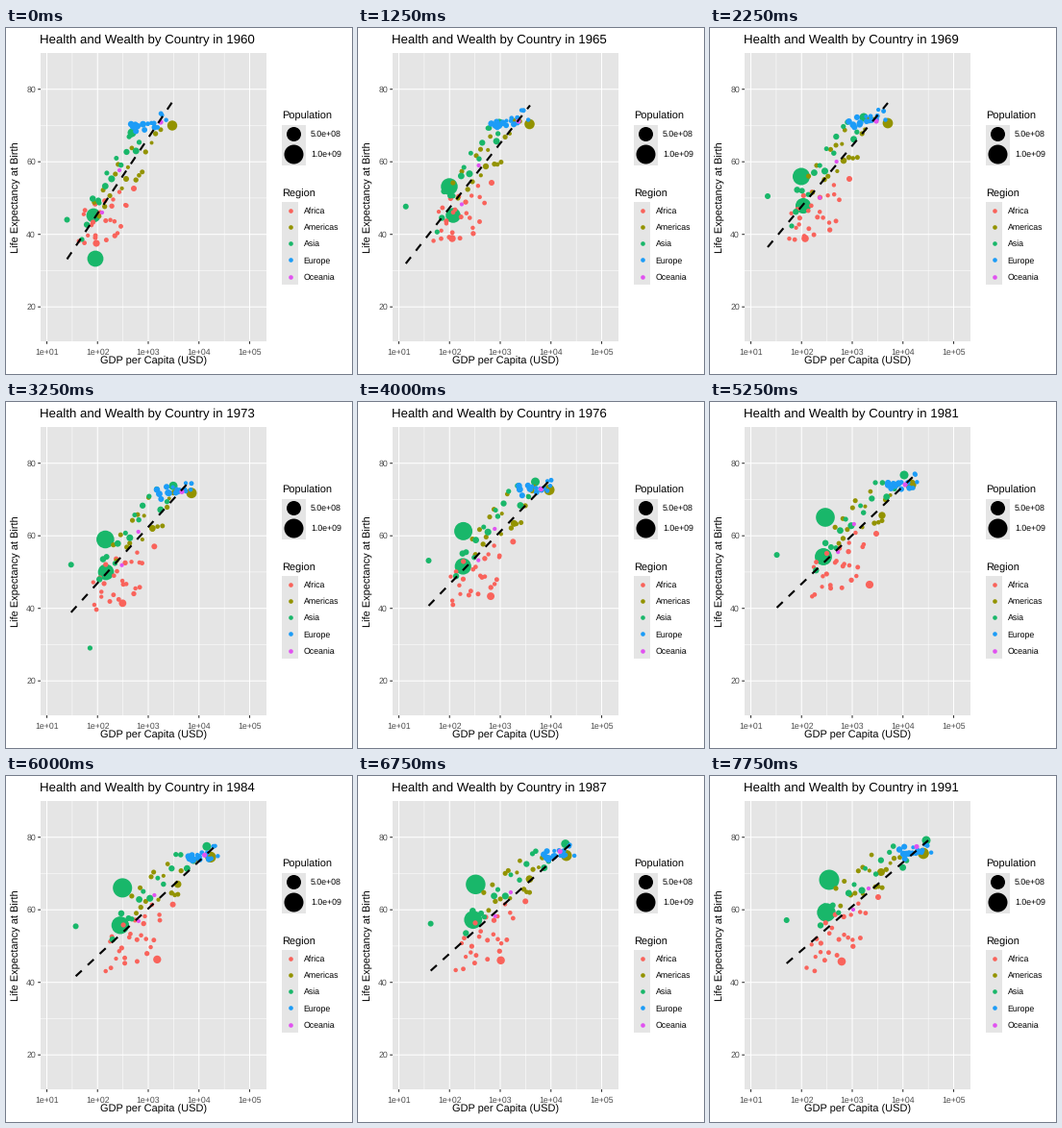
These frames come from a looping animation (360 by 360 pixels, 8000 ms). A matplotlib script:

```python
import numpy as np
import matplotlib.pyplot as plt
from matplotlib.animation import FuncAnimation
from matplotlib.patches import Rectangle

SIZE, YEARS, STEP = 360, 32, 250
FRAMES = np.arange(YEARS)
KEYS = (0, 5, 9, 21, 31)
COLORS = {"Africa": "#f9635b", "Americas": "#939300", "Asia": "#19b76a",
          "Europe": "#1c9cf7", "Oceania": "#e152f0"}
GREY = "#e5e5e5"

plt.rcParams["font.family"] = "Liberation Sans"
plt.rcParams["text.hinting"] = "none"
rng = np.random.default_rng(7)

# One pixel is one point, with y running down.
fig = plt.figure(figsize=(SIZE / 72, SIZE / 72), dpi=72, facecolor="white")
ax = fig.add_axes([0, 0, 1, 1])
ax.set(xlim=(0, SIZE), ylim=(SIZE, 0))
ax.axis("off")


def box(x, y, w, h):
    ax.add_patch(Rectangle((x, y), w, h, fc=GREY, ec="none", zorder=0))


def segment(x0, y0, x1, y1, color, width, z=1):
    ax.plot([x0, x1], [y0, y1], color=color, lw=width, zorder=z,
            solid_capstyle="butt", snap=False)


def label(x, y, s, size, ha="left", color="black", **kw):
    return ax.text(x, y, s, fontsize=size, ha=ha, va="baseline", color=color, **kw)


def draw_panel():
    box(36, 26, 235, 300)
    for i in range(5):
        x = 42.5 + 52.75 * i
        segment(x, 26, x, 326, "white", 1.07, 1.2)
        segment(x, 326, x, 328.8, "#333333", 1.07)
        label(x, 339.5, f"1e+0{i + 1}", 8.8, "center", "#4d4d4d")
        if i < 4:
            segment(x + 26.4, 26, x + 26.4, 326, "white", 0.53)
    for i in range(4):
        y = 290.2 - 75.5 * i
        segment(36, y, 271, y, "white", 1.07, 1.2)
        segment(33.2, y, 36, y, "#333333", 1.07)
        label(31, y + 3.2, str(20 * (i + 1)), 8.8, "right", "#4d4d4d")
        if i < 3:
            segment(36, y - 37.8, 271, y - 37.8, "white", 0.53)
    label(153.5, 350, "GDP per Capita (USD)", 11, "center")
    label(13.7, 176, "Life Expectancy at Birth", 11, "center",
          rotation=90, rotation_mode="anchor")


def draw_legend():
    def key(x, y, r, color):
        ax.scatter([x], [y], s=(2 * r) ** 2, c=color, linewidths=0, zorder=3)

    label(287, 95, "Population", 11)
    box(287, 101, 25, 42)
    for y, r, s in ((110, 7.5, "5.0e+08"), (131, 10, "1.0e+09")):
        key(299.2, y, r, "black")
        label(317, y + 3.2, s, 8.8)
    label(287, 175.5, "Region", 11)
    box(287, 181, 17.3, 86.4)
    for i, (name, color) in enumerate(COLORS.items()):
        y = 189.6 + 17.28 * i
        key(295.7, y, 2.3, color)
        label(309.5, y + 3.2, name, 8.8)


dots = []


def ramp(first, last):
    return np.linspace(first, last, YEARS)


def track(times, *points):
    """Interpolate waypoints into one x and one y per year."""
    return [np.interp(FRAMES, times, axis) for axis in zip(*points)]


def country(region, radii, x, y):
    dots.append((COLORS[region], x, y, ramp(*radii)))


def cloud(region, count, radii, center, spread, slope, scatter):
    """Scatter countries around a moving trend, each wandering a little."""
    cx, cy = track(KEYS, *center)
    along = np.linspace(-1.7, 1.7, count)
    across = rng.permutation(along)
    for u, v in zip(along, across):
        phase, turn = rng.uniform(0, 2 * np.pi, 2)
        dx = ramp(*spread) * u
        x = cx + dx + 2 * np.sin(FRAMES / 4 + phase)
        y = cy - ramp(*slope) * dx + scatter * v + 2 * np.sin(FRAMES / 3 + turn)
        r = rng.uniform(*radii)
        country(region, (r, r), x, y)


# The most populous countries lie at the bottom and follow their own paths.
country("Asia", (8.4, 10.5), *track(
    KEYS, (93, 240), (95, 165), (95, 154.5), (120, 120), (124, 108)))
country("Asia", (7.4, 9.7), *track(
    KEYS, (91, 195), (99, 195), (97, 185), (118, 161), (121, 142)))
country("Asia", (4.5, 4.5), *track(
    KEYS, (131, 109), (147, 99), (160, 93), (202, 76), (225, 67)))
country("Americas", (5.2, 5.8), *track(
    KEYS, (173, 101.5), (178.5, 100), (185, 99), (209, 86), (222, 80.5)))
country("Americas", (3, 4), *track(
    KEYS, (125, 157), (133, 144), (139, 138), (179, 118), (178, 100)))
country("Africa", (3.6, 4.3), *track(
    KEYS, (94, 224), (98, 219), (99, 219), (166, 190), (137, 193)))
country("Africa", (3, 3), *track(
    KEYS, (133, 167), (139, 161), (145, 157), (173, 137), (175, 126)))

cloud("Africa", 25, (2.1, 2.7), ((101, 200), (105, 196), (108, 194), (133, 172),
                                 (131, 168)), (14, 17), (0.5, 0.8), 14)
cloud("Americas", 17, (1.9, 2.7), ((125, 151), (134, 136), (138, 130), (161, 116),
                                   (165, 106)), (20, 19), (1.2, 0.6), 12)
cloud("Asia", 14, (2.4, 3.7), ((113, 150), (117, 142), (120, 138), (152, 121),
                               (160, 110)), (16, 27), (1.4, 0.7), 9)
cloud("Europe", 16, (2, 3.6), ((147, 100), (157, 97), (164, 95), (200, 85),
                               (213, 78)), (11, 9), (0.4, 0.3), 3.5)

country("Oceania", (2.6, 2.6), *track(
    KEYS, (161, 98), (167, 97), (173, 97), (203, 86), (215, 73.5)))
for start, end in (((118, 148), (165, 117)), ((100, 192), (149, 139))):
    country("Oceania", (2.1, 2.1), *track((0, YEARS - 1), start, end))

# One country collapses and then has no more data.
country("Asia", (2.6, 2.6), *track((0, 9, 14), (79, 220), (85, 206), (88, 268.5)))
dots[-1][3][15:] = 0

# The poorest and the richest set the ends of the trend line.
poor = track((0, 6, 9, 16, 20, 31), (63.5, 199.5), (47, 183), (60, 175),
             (73.5, 165), (68.5, 160), (79.7, 150))
country("Asia", (3, 3), *poor)
left = np.interp(FRAMES, (0, 6, 9, 16, 21, 31), (240.5, 246, 228, 212, 214, 195))
end_x, right = track((0, 5, 9, 16, 21, 31), (173, 77), (179, 80.5), (185, 78),
                     (198, 83), (211, 78), (227, 67))

colors, xs, ys, radii = zip(*dots)
spots = np.stack([xs, ys], axis=-1)
areas = (2 * np.array(radii)) ** 2

draw_panel()
draw_legend()
title = label(35, 16, "", 13.2)
points = ax.scatter(*spots[:, 0].T, c=colors, linewidths=0, zorder=4)
trend, = ax.plot([], [], color="black", lw=2.13, ls=(0, (4, 4)), zorder=5)


def update(n):
    title.set_text(f"Health and Wealth by Country in {1960 + n}")
    points.set_offsets(spots[:, n])
    points.set_sizes(areas[:, n])
    trend.set_data([poor[0][n], end_x[n]], [left[n], right[n]])
    return title, points, trend


anim = FuncAnimation(fig, update, frames=YEARS, interval=STEP, repeat=True,
                     repeat_delay=0, init_func=lambda: update(0))
plt.show()
```
